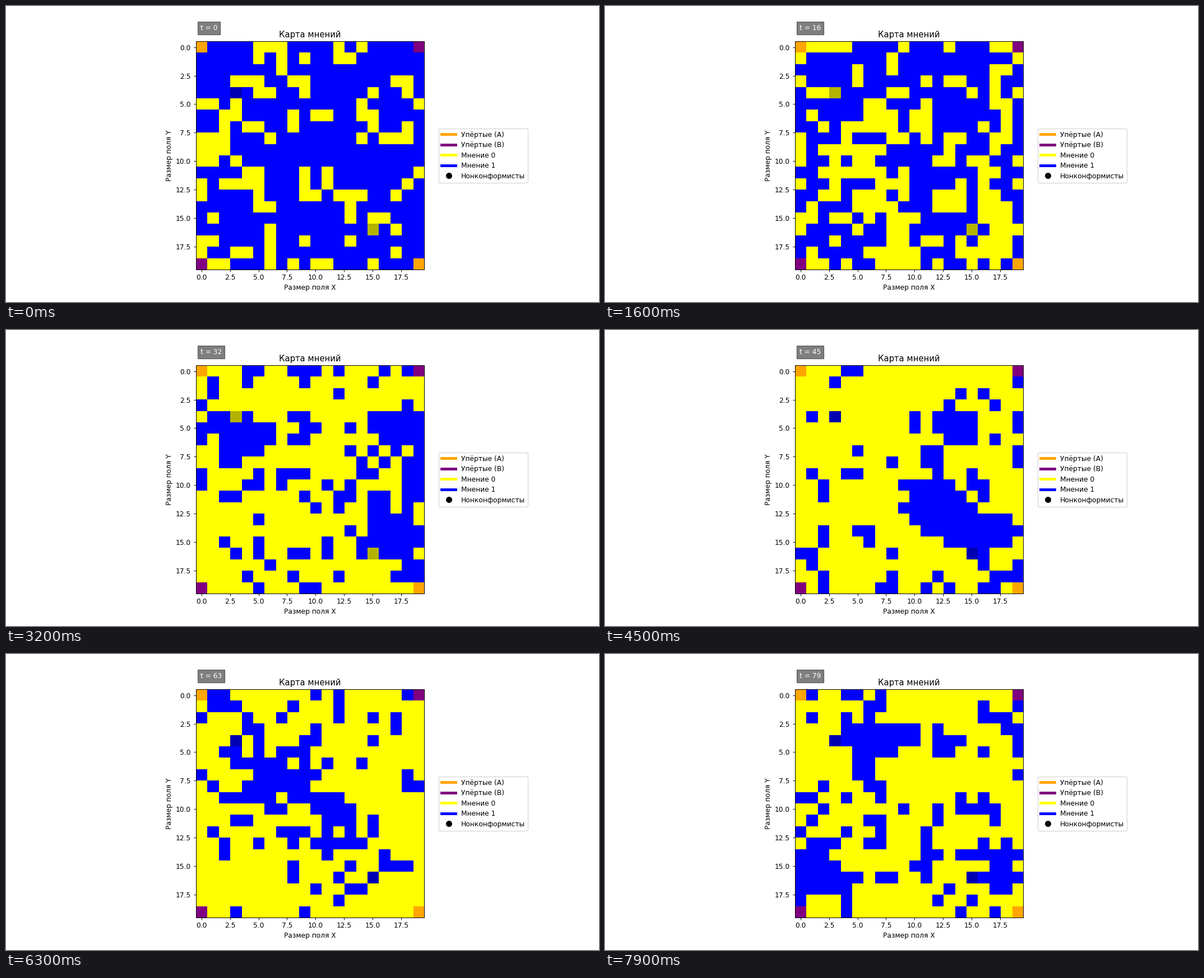
A matplotlib script that plays this animation: 1058 by 529 pixels, repeating every 8000 ms.

```python
import numpy as np
import matplotlib.pyplot as plt
from matplotlib.animation import FuncAnimation
from matplotlib.colors import to_rgb
from matplotlib.lines import Line2D

N = 20
STEPS = 80
A_CELLS = [(0, 0), (N - 1, N - 1)]
B_CELLS = [(0, N - 1), (N - 1, 0)]
REBELS = [(4, 3), (16, 15)]

# where groups of opinion 1 gather: step -> (column, row) centres
GROUPS = {
    9: [(8, 2), (3, 16)],
    22: [(13, 3), (1, 11)],
    32: [(3, 6), (17, 6), (18, 15)],
    45: [(13, 6), (12, 12), (16, 15)],
    63: [(7, 8), (12, 12)],
    79: [(6, 4), (0, 15), (18, 15)],
}
RADIUS = 2.6             # size of a group in cells
SPAN = 6                 # how long a group lasts, in steps
PULL = 2.6               # strength of a group against the noise
MEMORY = 0.85            # share of the noise kept from step to step

rows, cols = np.mgrid[:N, :N]


def neighbours(grid):
    pad = np.pad(grid, 1, mode="edge")
    return np.stack([pad[:-2, 1:-1], pad[2:, 1:-1], pad[1:-1, :-2], pad[1:-1, 2:]])


def share(step):
    """Part of the cells that hold opinion 1."""
    return 0.24 + 0.5 * np.exp(-(step / 26) ** 2) + 0.09 * (step / 79) ** 4


def gathering(step):
    field = np.zeros((N, N))
    for peak, centres in GROUPS.items():
        fade = np.exp(-((step - peak) / SPAN) ** 2)
        for x, y in centres:
            dist = np.hypot(cols - x, rows - y)
            field += PULL * fade * np.exp(-(dist / RADIUS) ** 2)
    return field


def opinions(step, noise):
    field = gathering(step) + noise + 0.5 * neighbours(noise).mean(axis=0)
    grid = (field > np.quantile(field, 1 - share(step))).astype(int)
    for cell in A_CELLS:
        grid[cell] = 0
    for cell in B_CELLS:
        grid[cell] = 1
    near = neighbours(grid).sum(axis=0)
    for cell in REBELS:
        grid[cell] = near[cell] <= 2
    return grid


def simulate():
    rng = np.random.default_rng(12)
    noise = rng.normal(size=(N, N))
    grids = []
    for step in range(STEPS):
        grids.append(opinions(step, noise))
        fresh = rng.normal(size=(N, N))
        noise = MEMORY * noise + np.sqrt(1 - MEMORY ** 2) * fresh
    return grids


def colour(grid):
    rgb = np.array([to_rgb("yellow"), to_rgb("blue")])[grid]
    for cell in REBELS:
        rgb[cell] *= 0.7
    for cell in A_CELLS:
        rgb[cell] = to_rgb("orange")
    for cell in B_CELLS:
        rgb[cell] = to_rgb("purple")
    return rgb


grids = simulate()

fig, ax = plt.subplots(figsize=(12, 6), dpi=88.167)
image = ax.imshow(colour(grids[0]))
ax.set_title("Карта мнений")
ax.set_xlabel("Размер поля X")
ax.set_ylabel("Размер поля Y")
label = ax.text(0.02, 1.05, "t = 0", transform=ax.transAxes, color="white",
                bbox=dict(facecolor="black", alpha=0.5))

entries = [("orange", "Упёртые (A)"), ("purple", "Упёртые (B)"),
           ("yellow", "Мнение 0"), ("blue", "Мнение 1")]
handles = [Line2D([0], [0], color=c, lw=4, label=name) for c, name in entries]
handles.append(Line2D([0], [0], marker="o", color="w", markerfacecolor="black",
                      markersize=10, label="Нонконформисты"))
ax.legend(handles=handles, loc="center left", bbox_to_anchor=(1.05, 0.5),
          labelspacing=0.45)


def update(step):
    image.set_data(colour(grids[step]))
    label.set_text(f"t = {step}")
    return image, label


anim = FuncAnimation(fig, update, frames=STEPS, interval=100, repeat=True,
                     repeat_delay=0, blit=False)
plt.show()
```
